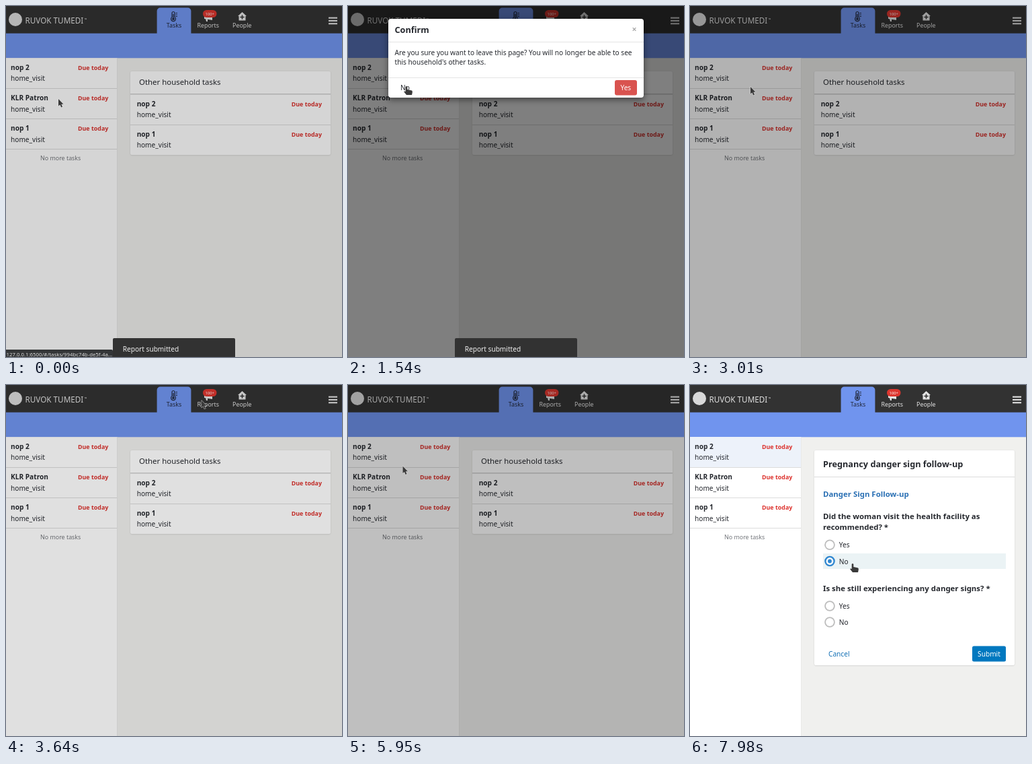
Recreate the animation shown at these times as an HTML page with a canvas. Size 500 px wide and 521 px high, loop 8000 ms.

```html
<!DOCTYPE html>
<html lang="en">
<head>
<meta charset="utf-8">
<title>Household tasks</title>
<style>
html, body { margin: 0; width: 100%; height: 100%; overflow: hidden; background: #f0f0ee; }
canvas { display: block; width: 500px; height: 521px; }
</style>
</head>
<body>
<canvas id="stage" width="500" height="521"></canvas>
<script>
const ctx = document.getElementById('stage').getContext('2d');
const LOOP = 8000, STEP = 70;
const FONT = '"Noto Sans", "Open Sans", sans-serif';
const SMALL = 8.88, BASE = 10.15, LARGE = 11.42, TITLE = 12.69;
const INK = '#25282e', RED = '#dc322d', BLUE = '#7094ee', LINK = '#2a70b4', PICKED = '#edf2fa';
const RULE = '#dcdcdc';

const clamp = v => Math.max(0, Math.min(1, v));
const ramp = (t, start, length) => clamp((t - start) / length);
const easeOut = p => 1 - (1 - p) ** 2.2;
const smooth = p => p * p * (3 - 2 * p);

function text(str, x, y, size = BASE, color = INK, bold = false, align = 'left') {
  ctx.font = `${bold ? 700 : 400} ${size}px ${FONT}`;
  ctx.textAlign = align;
  ctx.fillStyle = color;
  ctx.fillText(str, x, y);
}

function rect(x, y, w, h, color) {
  ctx.fillStyle = color;
  ctx.fillRect(x, y, w, h);
}

function box(x, y, w, h, radius, color) {
  ctx.beginPath();
  ctx.roundRect(x, y, w, h, radius);
  ctx.fillStyle = color;
  ctx.fill();
}

function disc(x, y, r, color) {
  ctx.beginPath();
  ctx.arc(x, y, r, 0, Math.PI * 2);
  ctx.fillStyle = color;
  ctx.fill();
}

function shadowed(blur, offset, alpha, draw) {
  ctx.save();
  ctx.shadowColor = `rgba(0,0,0,${alpha})`;
  ctx.shadowBlur = blur;
  ctx.shadowOffsetY = offset;
  draw();
  ctx.restore();
}

function shape(d, x, y, fill, stroke, width = 1) {
  const path = new Path2D(d);
  ctx.save();
  ctx.translate(x, y);
  ctx.lineJoin = ctx.lineCap = 'round';
  ctx.lineWidth = width;
  if (stroke) { ctx.strokeStyle = stroke; ctx.stroke(path); }
  if (fill) { ctx.fillStyle = fill; ctx.fill(path); }
  ctx.restore();
}

function drawHeader() {
  rect(0, 0, 500, 41, '#323232');
  rect(0, 40.6, 500, 36.7, BLUE);
  disc(14, 20, 10, '#d8d8d8');
  text('RUVOK TUMEDI', 28.5, 26, 11.7, '#dedede');
  text('™', 116.5, 22, 5, '#dedede');

  box(224.6, 2.5, 50.8, 39, [5, 5, 0, 0], BLUE);
  const dark = '#22293c';
  shape('M-2 8V2a2 2 0 0 1 4 0V8a3.4 3.4 0 1 1-4 0Z', 249, 8.5, null, dark, 1.2);
  shape('M0 4V10', 249, 8.5, null, dark, 1.3);
  disc(249, 19.3, 1.8, dark);
  shape('M4 2H5.5M4 4.5H5.5M4 7H5.5', 249, 8.5, null, dark, 1);
  text('Tasks', 250, 32, SMALL, dark, false, 'center');

  const pale = '#e4e4e4';
  shape('M0 3 12 0V8L0 6ZM2 6H5V10H3Z', 295, 13, pale);
  box(293, 6, 20.5, 11, 5.5, '#dc362f');
  text('100+', 303.2, 13.6, 5.8, '#fff', false, 'center');
  text('Reports', 300.7, 32, SMALL, pale, false, 'center');

  shape('M0 6 6.5 0 13 6H11.5V12.5H1.5V6Z', 345, 9, pale);
  shape('M6.5 5V10M4 7.5H9', 345, 9, null, '#323232', 1.6);
  text('People', 351.3, 32, SMALL, pale, false, 'center');

  for (let i = 0; i < 3; i++) rect(480, 16.6 + i * 4.3, 13, 2.1, '#e0e0e0');
}

function drawTask(name, x, top, right) {
  text(name, x, top + 17, BASE, INK, true);
  text('home_visit', x, top + 33.4);
  text('Due today', right, top + 17, SMALL, RED, true, 'right');
}

function drawList(selected) {
  rect(0, 77.3, 165, 444, '#fff');
  if (selected) rect(0, 77.3, 165, 45, PICKED);
  ['nop 2', 'KLR Patron', 'nop 1'].forEach((name, i) => {
    const top = 78 + i * 45.2;
    drawTask(name, 7, top, 152.3);
    rect(0, Math.round(top + 44), 165, 1, RULE);
  });
  text('No more tasks', 81.2, 229, SMALL, '#74777c', false, 'center');
  rect(165, 77.3, 1, 444, '#e9e9e8');
}

function drawCard(height, titleHeight) {
  shadowed(2, 0.4, 0.16, () => box(185, 97, 298, height, 2, '#fff'));
  rect(185, 97 + titleHeight, 298, 1, RULE);
}

function drawHousehold(hover) {
  drawCard(124, 33);
  if (hover) rect(185, 131, 298, 45, PICKED);
  rect(185, 130, 298, 1.5, '#d0d0d0');
  text('Other household tasks', 198, 117, LARGE);
  drawTask('nop 2', 194.7, 132, 470);
  drawTask('nop 1', 194.7, 177, 470);
  rect(185, 176, 298, 1, RULE);
}

function drawOption(label, y, checked, hover) {
  if (hover) rect(198, y - 11.5, 272, 23, '#ebf3f5');
  disc(208, y, 7.8, checked ? '#3087d0' : '#bdbdbd');
  disc(208, y, checked ? 5.4 : 6, '#fff');
  if (checked) disc(208, y, 2.9, '#3087d0');
  text(label, 221.7, y + 4);
}

function drawForm(cursorY, checked) {
  drawCard(319, 39);
  text('Pregnancy danger sign follow-up', 198, 121.5, TITLE, INK, true);
  text('Danger Sign Follow-up', 198, 166, LARGE, LINK, true);
  text('Did the woman visit the health facility as', 198, 199, LARGE, INK, true);
  text('recommended? *', 198, 214.5, LARGE, INK, true);
  const over = y => Math.abs(cursorY - y) < 12;
  drawOption('Yes', 237.3, false, over(237.3));
  drawOption('No', 261.5, checked, over(261.5));
  text('Is she still experiencing any danger signs? *', 198, 305.5, LARGE, INK, true);
  drawOption('Yes', 328, false, false);
  drawOption('No', 352, false, false);
  text('Cancel', 206, 402.5, BASE, '#1672b6');
  box(420, 387.5, 50, 23, 2.5, '#0078bf');
  text('Submit', 445, 402.7, BASE, '#fff', false, 'center');
}

function drawModal(opacity, shift) {
  ctx.save();
  ctx.globalAlpha = opacity;
  ctx.translate(0, -29 * shift);
  shadowed(10, 3, 0.5, () => box(60, 19, 380, 117, 4, '#fff'));
  rect(60, 53, 380, 1, '#e5e5e5');
  rect(60, 106, 380, 1, '#e5e5e5');
  text('Confirm', 69.5, 40, TITLE, INK, true);
  text('×', 426, 38.5, 12.5, '#aaa', true, 'center');
  text('Are you sure you want to leave this page? You will no longer be able to see', 69.5, 73);
  text("this household's other tasks.", 69.5, 87.3);
  text('No', 78, 125.3);
  box(397, 110, 33, 22.5, 3, '#d9534f');
  text('Yes', 413.3, 125.3, BASE, '#fff', false, 'center');
  ctx.restore();
}

function drawCursor({ x, y, hand }) {
  const d = hand
    ? 'M-1.3 1Q0-.8 1.3 1V5L8 6.5Q9 7 8.8 9L8 13H0L-3.6 8.6Q-3.8 7-1.3 8Z'
    : 'M0 0V10.5L2.4 8.4 4.2 12.4 6 11.6 4.3 7.8H7.5Z';
  shape(d, x, y, '#3a3a3a', 'rgba(235,235,235,.6)', 1.2);
}

// Each move: start time, duration, end point, and whether the pointer rests on something clickable.
const MOVES = [
  [0, 0, 78, 138, false],
  [210, 560, 84, 137, false],
  [910, 600, 87, 119, true],
  [2870, 70, 90, 120, false],
  [3100, 440, 291, 23, false],
  [3850, 740, 82, 119, true],
  [5860, 60, 81.5, 120.5, false],
  [6030, 340, 236, 153, true],
  [7280, 490, 242, 265, true]
];

function cursorAt(t) {
  let [, , x, y, hand] = MOVES[0];
  for (const [start, length, endX, endY, endHand] of MOVES) {
    if (t < start) break;
    const p = length ? smooth(ramp(t, start, length)) : 1;
    x += (endX - x) * p;
    y += (endY - y) * p;
    if (p > 0.85) hand = endHand;
    else if (t < 7000) hand = false;
  }
  return { x, y, hand };
}

const DIALOGS = [
  { dimIn: -50, close: 2590, dimOut: 2950 },
  { dimIn: 3604, close: 5600, dimOut: 5875 }
];

function drawDialog(t, { dimIn, close, dimOut }) {
  const dim = 0.5 * (ramp(t, dimIn, 150) - ramp(t, dimOut, 150));
  if (dim > 0) rect(0, 0, 500, 521, `rgba(0,0,0,${dim})`);
  const open = dimIn + 150;
  const opacity = ramp(t, open, 150) - ramp(t, close, 150);
  const shift = 1 - easeOut(ramp(t, open, 300)) + easeOut(ramp(t, close, 300));
  if (opacity > 0) drawModal(opacity, shift);
}

function drawToast(t) {
  const gone = smooth(ramp(t, 1820, 280));
  if (gone === 1) return;
  const y = 493 + 28 * gone;
  box(159, y, 182, 30, [2, 2, 0, 0], '#323232');
  text('Report submitted', 173.7, y + 20, BASE, '#eee');
}

function drawStatus() {
  box(0, 510, 159, 11, [0, 2, 0, 0], '#343638');
  text('127.0.0.1:6500/#/tasks/994bc74b-de5f-4a...', 0.5, 519.5, 7.8, '#dcdcdc');
}

function draw(t) {
  const cursor = cursorAt(t);
  const formOpen = t >= 7000;
  const overTask = t >= 6300 && !formOpen;
  rect(0, 0, 500, 521, '#f0f0ee');
  drawHeader();
  drawList(formOpen);
  if (formOpen) drawForm(cursor.y, t >= 7840);
  else drawHousehold(overTask);
  DIALOGS.forEach(dialog => drawDialog(t, dialog));
  drawToast(t);
  if (t < 140 || overTask) drawStatus();
  drawCursor(cursor);
}

function tick() {
  const t = performance.now() % LOOP;
  draw(Math.floor(t / STEP) * STEP);
  requestAnimationFrame(tick);
}
tick();
</script>
</body>
</html>
```
